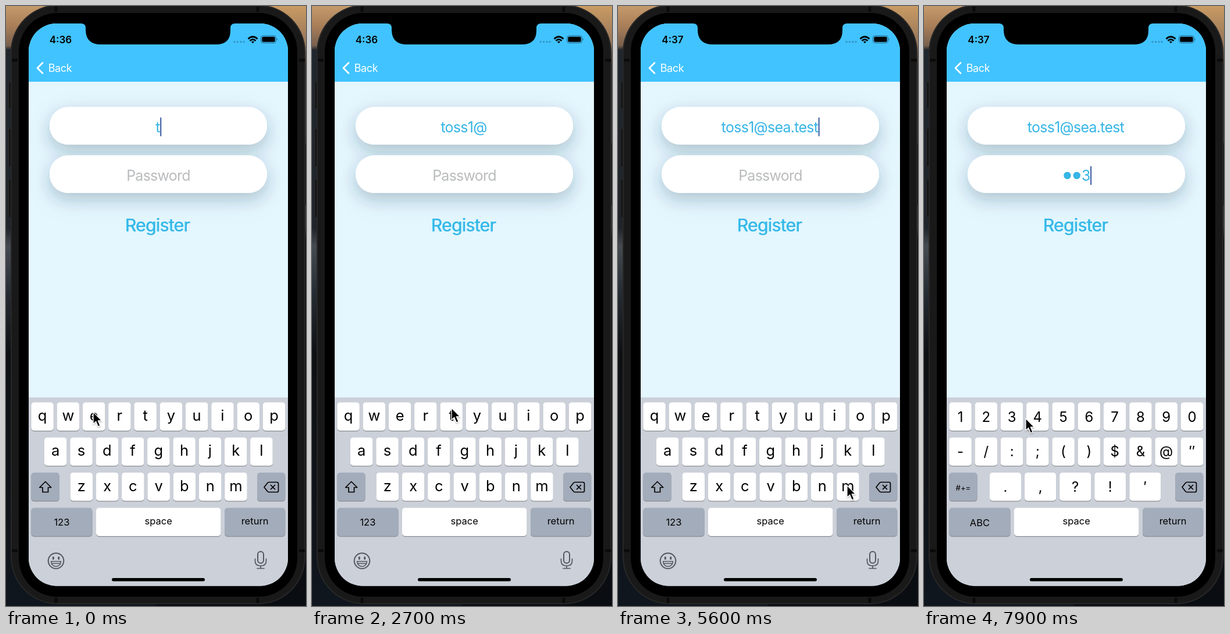
An HTML page that plays this animation: 516x1030 px, repeating every 8 s.

```html
<!DOCTYPE html>
<html lang="en">
<head>
<meta charset="utf-8">
<title>Register form</title>
<style>
  html, body { margin: 0; width: 100%; height: 100%; overflow: hidden; background: #000; }
  svg { display: block; width: 516px; height: 1030px; }
  text { font-family: Inter, Roboto, sans-serif; text-anchor: middle; white-space: pre; }
  .field { font-size: 25px; letter-spacing: -.03em; }
  .blue { fill: #36b5e6; }
  .line { fill: none; stroke-linecap: round; stroke-linejoin: round; }
</style>
</head>
<body>
<svg viewBox="0 0 516 1030">
  <defs>
    <linearGradient id="desk" x2="0" y2="1">
      <stop offset="0" stop-color="#c59a6b"/>
      <stop offset=".035" stop-color="#a77d58"/>
      <stop offset=".066" stop-color="#78604e"/>
      <stop offset=".073" stop-color="#20262d"/>
      <stop offset=".37" stop-color="#20252b"/>
      <stop offset=".4" stop-color="#454b51"/>
      <stop offset=".48" stop-color="#252b32"/>
      <stop offset=".58" stop-color="#0e1013"/>
      <stop offset="1" stop-color="#10161e"/>
    </linearGradient>
    <linearGradient id="deskRight" x2="0" y2="1">
      <stop offset="0" stop-color="#c99b63"/>
      <stop offset=".06" stop-color="#98765a"/>
      <stop offset=".1" stop-color="#3b3432"/>
      <stop offset=".37" stop-color="#3a3a3c"/>
      <stop offset=".39" stop-color="#050608"/>
      <stop offset="1" stop-color="#0a0d12"/>
    </linearGradient>
    <clipPath id="screen"><rect x="39" y="30" width="446" height="965.5" rx="48"/></clipPath>
    <filter id="soft" x="-20%" y="-80%" width="140%" height="300%">
      <feDropShadow dx="0" dy="11" stdDeviation="12" flood-color="#1c4452" flood-opacity=".22"/>
    </filter>
    <filter id="wide" x="-20%" y="-80%" width="140%" height="300%">
      <feDropShadow dx="0" dy="10" stdDeviation="22" flood-color="#1c4452" flood-opacity=".07"/>
    </filter>
    <filter id="drop" x="-50%" y="-50%" width="200%" height="200%">
      <feDropShadow dx="0" dy="1.5" stdDeviation="1" flood-opacity=".3"/>
    </filter>
  </defs>

  <!-- desktop and phone body -->
  <rect width="258" height="1030" fill="url(#desk)"/>
  <rect x="258" width="258" height="1030" fill="url(#deskRight)"/>
  <g fill="#151515" stroke="#2c2c2e">
    <rect x="4.5" y="130" width="8" height="47" rx="2"/>
    <rect x="4.5" y="210" width="8" height="66" rx="2"/>
    <rect x="4.5" y="297" width="8" height="66" rx="2"/>
    <rect x="509" y="235" width="8" height="107" rx="2"/>
  </g>
  <rect x="9" y="-1" width="505" height="1027" rx="80" fill="#191919" stroke="#272727" stroke-width="2"/>
  <rect x="22" y="12" width="479" height="1002" rx="66" fill="#000"/>
  <path d="M10 93h10M504 93h10M10 935h10M504 935h10M86 1v9M433 1v9M86 1016v9M433 1016v9" stroke="#0b0b0b" stroke-width="5"/>

  <g clip-path="url(#screen)">
    <rect x="39" y="30" width="446" height="966" fill="#e4f6fe"/>
    <rect x="39" y="30" width="446" height="100" fill="#41c3ff"/>
    <g fill="#fff">
      <g filter="url(#wide)">
        <rect x="75" y="173.500" width="374" height="64.500" rx="32" filter="url(#soft)"/>
        <rect x="75" y="256.500" width="374" height="64.500" rx="32" filter="url(#soft)"/>
      </g>
      <rect x="75" y="173.500" width="374" height="64.500" rx="32"/>
      <rect x="75" y="256.500" width="374" height="64.500" rx="32"/>
    </g>
    <rect x="39" y="30" width="446" height="100" fill="#41c3ff"/>
    <rect x="39" y="672" width="446" height="324" fill="#cbd0d9"/>
    <path d="M129 30Q137 30 137 38V42Q138 66 163 66H361Q386 66 386 42V38Q386 30 394 30Z"/>
  </g>

  <!-- status bar and navigation -->
  <text id="clock" x="94" y="63.500" font-size="17" font-weight="600"></text>
  <path d="M393 61.500h0M398.500 61.500h0M404 61.500h0M409 61.500h0" class="line" stroke="#3597c6" stroke-width="3.600"/>
  <g class="line" stroke="#000" stroke-width="2.700" style="stroke-linecap:butt">
    <path d="M416.500 56.500Q424.500 49 432.500 56.500M419.500 59.800Q424.500 55 429.500 59.800"/>
    <path d="M422 61.500Q424.500 59.500 427 61.500L424.500 64Z" fill="#000" stroke="none"/>
  </g>
  <rect x="438.500" y="51" width="26" height="12.500" rx="3.700" fill="none" stroke="#1f6287"/>
  <rect x="440.300" y="52.800" width="22.400" height="9" rx="2"/>
  <path d="M466 55.200q2 2 0 4z" fill="#1f6287"/>
  <path d="M63 97.500L54 106.500L63 115.500" class="line" stroke="#fff" stroke-width="2.700"/>
  <text x="93" y="112.500" font-size="18" letter-spacing="-.02em" fill="#fff">Back</text>

  <!-- form -->
  <text id="email" class="field blue" x="261" y="217"></text>
  <text id="hint" class="field" x="262" y="300" fill="#b9bbbd">Password</text>
  <g id="secret" class="blue"></g>
  <rect id="caret" width="2" height="32" fill="#36589f"/>
  <text class="blue" x="261" y="387" font-size="30" letter-spacing="-.02em" style="text-shadow:-1px 0 #55d8f6">Register</text>

  <!-- keyboard -->
  <g id="letters"></g>
  <g id="numbers"></g>
  <g id="shared"></g>
  <path d="M456 817.500H466Q468.500 817.500 468.500 820V832Q468.500 834.500 466 834.500H452.500Q451 834.500 450 833.500L444 826L450 818.500Q451 817.500 452.500 817.500ZM455.500 822.500l7 7m0-7l-7 7" class="line" stroke="#000" stroke-width="1.700"/>
  <g id="extras" class="line" stroke="#54575c" stroke-width="2">
    <circle cx="86" cy="952.500" r="13.300"/>
    <path d="M81.300 946.500v2.500M90.700 946.500v2.500" stroke-width="3"/>
    <path d="M77.500 953.500H94.500Q93.500 962 86 962T77.500 953.500ZM79.500 957H92.500" stroke-width="1.600"/>
    <rect x="433" y="936.500" width="10" height="20" rx="5"/>
    <path d="M428.500 949V953Q428.500 961 438 961T447.500 953V949M438 961V965.500M432 965.500H444" stroke-width="1.700"/>
  </g>
  <rect x="182" y="982" width="160" height="5.500" rx="2.700"/>

  <path id="pointer" d="M0 0V20.500L4.700 16.300L8.300 25L12 23.400L8.400 15H14.800Z" stroke="#fff" stroke-width="1.300" filter="url(#drop)"/>
</svg>

<script>
const LOOP = 8000, STEP = 100, NS = 'http://www.w3.org/2000/svg';
const $ = id => document.getElementById(id);

function add(parent, tag, attrs, content = '') {
  const node = document.createElementNS(NS, tag);
  for (const name in attrs) node.setAttribute(name, attrs[name]);
  node.textContent = content;
  parent.append(node);
  return node;
}

function key(parent, x, y, width, label, size, baseline, fill = '#fff') {
  const box = { x, width, height: 48.5, rx: 5 };
  add(parent, 'rect', { ...box, y: y + 1.2, fill: '#8b8e94' });
  add(parent, 'rect', { ...box, y, fill });
  add(parent, 'text', { x: x + width / 2, y: y + baseline, 'font-size': size }, label);
}

function row(parent, labels, x, y, size, baseline, pitch = 44.27, width = 38.5) {
  [...labels].forEach((label, i) => key(parent, x + i * pitch, y, width, label, size, baseline));
}

const GREY = '#a3acba', letters = $('letters'), numbers = $('numbers'), shared = $('shared');
row(letters, 'qwertyuiop', 43.3, 680.5, 25.5, 31.5);
row(letters, 'asdfghjkl', 66, 740.8, 25.5, 31.2);
row(letters, 'zxcvbnm', 110.6, 801, 25.5, 32);
key(letters, 43.3, 801, 48.3, '', 16, 30, GREY);
add(letters, 'path', {
  d: 'M67.700 816.500L77.700 826.500H72.500V834.500H63V826.500H57.700Z',
  class: 'line', stroke: '#000', 'stroke-width': 1.7
});
key(letters, 43.3, 861.5, 105.2, '123', 16.5, 30, GREY);

row(numbers, '1234567890', 43.3, 680.5, 24, 33);
row(numbers, '-/:;()$&@″', 43.3, 740.8, 24, 32.5);
row(numbers, '.,?!′', 113, 801, 24, 33, 60.1, 54);
key(numbers, 43.3, 801, 48.3, '#+=', 13.2, 30.5, GREY);
key(numbers, 43.3, 861.5, 105.2, 'ABC', 16.5, 31, GREY);

key(shared, 432, 801, 48.3, '', 16, 30, GREY);
key(shared, 155, 861.5, 214.5, 'space', 16.5, 28.8);
key(shared, 376, 861.5, 104.3, 'return', 16.5, 28.8, GREY);

// Pointer stops: time, x, y, action on arrival
const stops = [
  [0, 150, 697], [100, 150, 698, 'type'], [400, 128, 760, 'type'], [700, 238, 703, 'type'],
  [1000, 98, 884, 'numbers'], [1300, 64, 704, 'type'], [1500, 70, 740], [2000, 415, 763, 'type'],
  [2400, 100, 884, 'letters'], [2700, 240, 690], [2800, 240, 695, 'type'], [3050, 150, 702, 'type'],
  [3450, 129, 762, 'type'], [3700, 223, 713], [3850, 237, 706, 'type'], [4150, 100, 884, 'numbers'],
  [4400, 138, 824, 'type'], [4600, 112, 884, 'letters'], [4700, 113, 884], [5000, 217, 824, 'type'],
  [5300, 415, 704, 'type'], [5600, 394, 823, 'type'], [6100, 292, 280, 'password'], [6400, 292, 280],
  [6800, 98, 884, 'numbers'], [7150, 64, 704, 'type'], [7450, 107, 704, 'type'],
  [7700, 152, 705, 'type'], [7900, 175, 708]
];
const ADDRESS = 'toss1@sea.test', CODE = '123';

function pointerAt(t) {
  const next = stops.findIndex(stop => stop[0] > t);
  if (next < 0) return stops.at(-1).slice(1, 3);
  const [t0, x0, y0] = stops[next - 1], [t1, x1, y1] = stops[next];
  const p = (t - t0) / (t1 - t0), ease = p * p * (3 - 2 * p);
  return [x0 + (x1 - x0) * ease, y0 + (y1 - y0) * ease];
}

function stateAt(t) {
  const state = { email: 1, code: 0, numeric: false, password: false, edited: 0 };
  for (const [time, , , action] of stops) {
    if (time > t) break;
    if (action === 'type') state[state.password ? 'code' : 'email']++;
    if (action === 'numbers' || action === 'letters') state.numeric = action === 'numbers';
    if (action === 'password') state.password = true;
    if (action === 'type' || action === 'password') state.edited = time;
  }
  return state;
}

// Earlier digits become dots; returns the right edge
function drawSecret(count) {
  const group = $('secret'), pitch = 16.3;
  group.replaceChildren();
  if (!count) return 204;
  const digit = add(group, 'text', { class: 'field', y: 300 }, CODE[count - 1]);
  const size = digit.getComputedTextLength(), total = (count - 1) * pitch + size;
  const left = 262 - total / 2;
  for (let i = 0; i < count - 1; i++)
    add(group, 'circle', { cx: left + (i + .5) * pitch, cy: 291, r: 6.2 });
  digit.setAttribute('x', left + total - size / 2);
  return left + total;
}

function caretOpacity(age) {
  const phase = age % 1000;
  if (phase < 500) return 1;
  return phase < 700 ? (700 - phase) / 200 : Math.max(0, (phase - 850) / 150);
}

function render(t) {
  const state = stateAt(t), email = $('email'), caret = $('caret');
  email.textContent = ADDRESS.slice(0, state.email);
  $('clock').textContent = t < 3200 ? '4:36' : '4:37';
  $('hint').style.display = state.code ? 'none' : '';
  letters.style.display = state.numeric ? 'none' : '';
  numbers.style.display = state.numeric ? '' : 'none';
  $('extras').style.display = state.password ? 'none' : '';
  const secretEnd = drawSecret(state.code);
  caret.setAttribute('x', state.password ? secretEnd + .5 : 261 + email.getComputedTextLength() / 2 + .5);
  caret.setAttribute('y', state.password ? (state.code ? 275 : 274) : 191.5);
  caret.setAttribute('opacity', caretOpacity(t - state.edited));
  $('pointer').setAttribute('transform', `translate(${pointerAt(t).join(' ')})`);
}

let shown = -1;
function tick() {
  const t = Math.floor(performance.now() % LOOP / STEP) * STEP;
  if (t !== shown) render(shown = t);
  requestAnimationFrame(tick);
}
tick();
</script>
</body>
</html>
```
